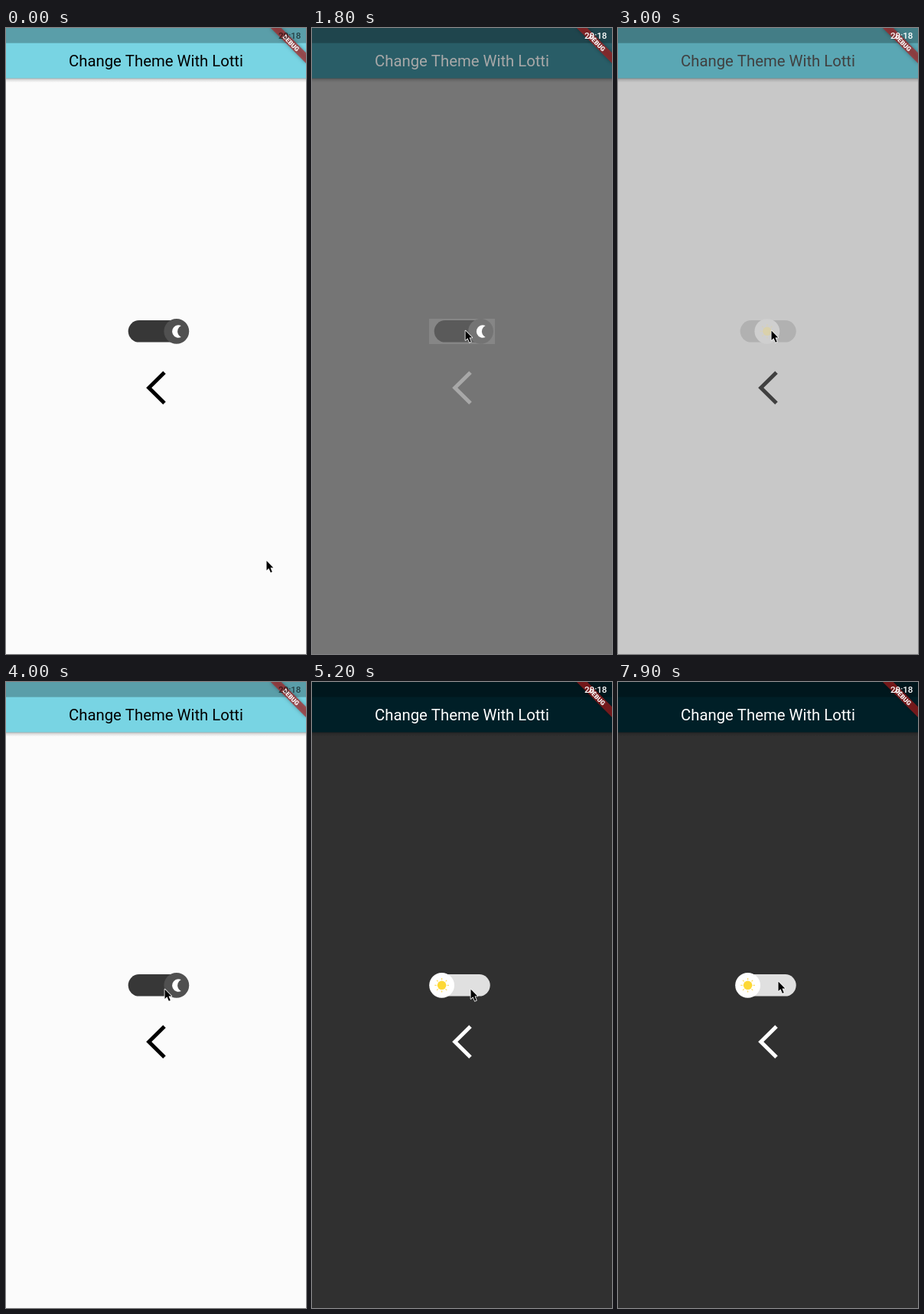
Write an HTML page with a canvas that moves like this. It is 392 px wide and 816 px high and loops after 8 s.

```html
<!DOCTYPE html>
<html lang="en">
<head>
<meta charset="utf-8">
<title>Theme switch</title>
<style>
  html, body { margin: 0; width: 100%; height: 100%; overflow: hidden; background: #fafafa; }
  canvas { display: block; width: 392px; height: 816px; }
</style>
</head>
<body>
<canvas id="stage" width="392" height="816"></canvas>
<script>
const W = 392, H = 816, LOOP = 8000, STEP = 100;
const ctx = document.getElementById('stage').getContext('2d');

// Each tap: ink fades in, theme and switch start, ink fades out
const taps = [
  { ink: 1550, start: 1668, out: 1740, dark: true },
  { ink: 2670, start: 2850, out: 2800, dark: false },
  { ink: 4780, start: 4790, out: 4850, dark: true }
];

// Pointer keys: time, x, y
const pointer = [
  [0, 340, 694], [900, 215, 397], [1000, 200, 394], [3600, 200, 394],
  [3700, 206, 399], [3800, 213, 402], [4000, 207, 400], [5250, 207, 400],
  [5600, 200, 487], [5700, 201, 482], [5900, 194, 470], [6000, 194, 470],
  [6300, 198, 487], [6700, 213, 396], [6800, 213, 396], [6900, 204, 394],
  [7000, 204, 394], [7400, 194, 466], [7900, 209, 390]
];

const clamp = v => Math.max(0, Math.min(1, v));
const lerp = (a, b, k) => a + (b - a) * k;
const smoother = k => k * k * k * (k * (6 * k - 15) + 10);
const mix = (a, b, k, alpha = 1) =>
  `rgba(${a.map((v, i) => Math.round(lerp(v, b[i], k))).join()},${alpha})`;
const gray = v => [v, v, v];

function disc(x, y, r, fill) {
  ctx.fillStyle = fill;
  ctx.beginPath();
  ctx.arc(x, y, r, 0, 7);
  ctx.fill();
}

function label(text, x, y, font, fill) {
  ctx.font = font + ' Roboto, sans-serif';
  ctx.fillStyle = fill;
  ctx.textAlign = 'center';
  ctx.fillText(text, x, y);
}

// theme: 0 light, 1 dark; knob: 0 sun side, 1 moon side
function stateAt(t) {
  const s = { theme: 0, knob: 1, ink: 0, whiteClock: false };
  for (const tap of taps) {
    const to = tap.dark ? 1 : 0;
    if (t >= tap.start) {
      s.theme = lerp(1 - to, to, clamp((t - tap.start) / 200));
      s.knob = lerp(to, 1 - to, smoother(clamp((t - tap.start) / 400)));
    }
    if (t >= tap.start + (tap.dark ? 100 : 250)) s.whiteClock = tap.dark;
    s.ink += clamp((t - tap.ink) / 200) * clamp(1 - (t - tap.out) / 200);
  }
  return s;
}

function pointerAt(t) {
  let i = 1;
  while (i < pointer.length - 1 && t > pointer[i][0]) i++;
  const a = pointer[i - 1], b = pointer[i];
  const k = clamp((t - a[0]) / (b[0] - a[0]));
  return [lerp(a[1], b[1], k), lerp(a[2], b[2], k)];
}

function drawBar(s) {
  const shadow = ctx.createLinearGradient(0, 65, 0, 71);
  shadow.addColorStop(0, 'rgba(0,0,0,.36)');
  shadow.addColorStop(0.4, 'rgba(0,0,0,.13)');
  shadow.addColorStop(1, 'rgba(0,0,0,0)');
  ctx.fillStyle = shadow;
  ctx.fillRect(0, 65, W, 6);
  ctx.fillStyle = mix([120, 212, 227], [0, 31, 39], s.theme);
  ctx.fillRect(0, 0, W, 65.5);
  ctx.fillStyle = 'rgba(0,0,0,.255)';
  ctx.fillRect(0, 0, W, 19.7);
  label('Change Theme With Lotti', 196, 49.5, '20.3px', mix(gray(0), gray(255), s.theme));
}

function drawBanner() {
  ctx.save();
  ctx.translate(W, 0);
  ctx.rotate(Math.PI / 4);
  ctx.shadowColor = 'rgba(0,0,0,.5)';
  ctx.shadowBlur = 5;
  ctx.fillStyle = 'rgba(183,28,28,.63)';
  ctx.fillRect(-32.6, 22.8, 65.2, 9.8);
  ctx.shadowColor = 'transparent';
  label('DEBUG', 0, 30.7, '900 8.3px', '#fff');
  ctx.restore();
}

function drawMoon(x, y) {
  const r = 8.2, gap = 7, a = Math.acos(gap / 2 / r);
  ctx.fillStyle = '#fff';
  ctx.beginPath();
  ctx.arc(x, y, r, a, 2 * Math.PI - a);
  ctx.arc(x + gap, y, r, Math.PI + a, Math.PI - a, true);
  ctx.fill();
}

function drawSun(x, y) {
  disc(x, y, 5.8, '#fdd835');
  ctx.strokeStyle = '#fbdc62';
  ctx.lineWidth = 1.2;
  ctx.beginPath();
  for (let i = 0; i < 8; i++) {
    const c = Math.cos(i * Math.PI / 4), d = Math.sin(i * Math.PI / 4);
    ctx.moveTo(x + c * 7, y + d * 7);
    ctx.lineTo(x + c * 9.3, y + d * 9.3);
  }
  ctx.stroke();
}

function drawSwitch(s) {
  const k = s.knob, y = 395.3;
  ctx.fillStyle = mix(gray(188), gray(204), s.theme, s.ink * lerp(0.4, 0.25, s.theme));
  ctx.fillRect(153, 379, 86, 33);

  ctx.fillStyle = mix(gray(224), gray(55), k);
  ctx.beginPath();
  ctx.roundRect(159.7, y - 14.3, 73, 28.6, 14.3);
  ctx.fill();

  const x = lerp(169.6, 222.8, 1 - (1 - k) ** 2);
  disc(x, y, 16.4, mix(gray(255), gray(80), k));
  ctx.globalAlpha = clamp(1 - k * 2.8);
  drawSun(x, y);
  ctx.globalAlpha = clamp((k - 0.4) / 0.4);
  drawMoon(x + 2.5, y + 0.2);
  ctx.globalAlpha = 1;
}

function drawChevron(s) {
  ctx.strokeStyle = mix(gray(0), gray(255), s.theme);
  ctx.lineWidth = 5;
  ctx.beginPath();
  ctx.moveTo(207, 449);
  ctx.lineTo(186.7, 469);
  ctx.lineTo(207, 489);
  ctx.stroke();
}

function drawPointer([x, y]) {
  ctx.save();
  ctx.translate(x + 0.5, y + 0.5);
  const shape = new Path2D('M0 0V12.5L2.9 9.8L5.3 15.3L7.3 14.4L5 9H8.8Z');
  ctx.strokeStyle = '#fff';
  ctx.lineWidth = 1.6;
  ctx.lineJoin = 'round';
  ctx.stroke(shape);
  ctx.fillStyle = '#000';
  ctx.fill(shape);
  ctx.restore();
}

function draw(t) {
  const s = stateAt(t);
  ctx.fillStyle = mix(gray(251), gray(48), s.theme);
  ctx.fillRect(0, 0, W, H);
  drawBar(s);
  drawSwitch(s);
  drawChevron(s);
  drawBanner();
  label('20:18', 370.7, 14.2, '500 11.6px', s.whiteClock ? '#fff' : 'rgba(0,0,0,.6)');
  drawPointer(pointerAt(t));
}

const origin = performance.now();
function tick() {
  const t = (performance.now() - origin) % LOOP;
  draw(Math.floor(t / STEP) * STEP);
  requestAnimationFrame(tick);
}
tick();
</script>
</body>
</html>
```
